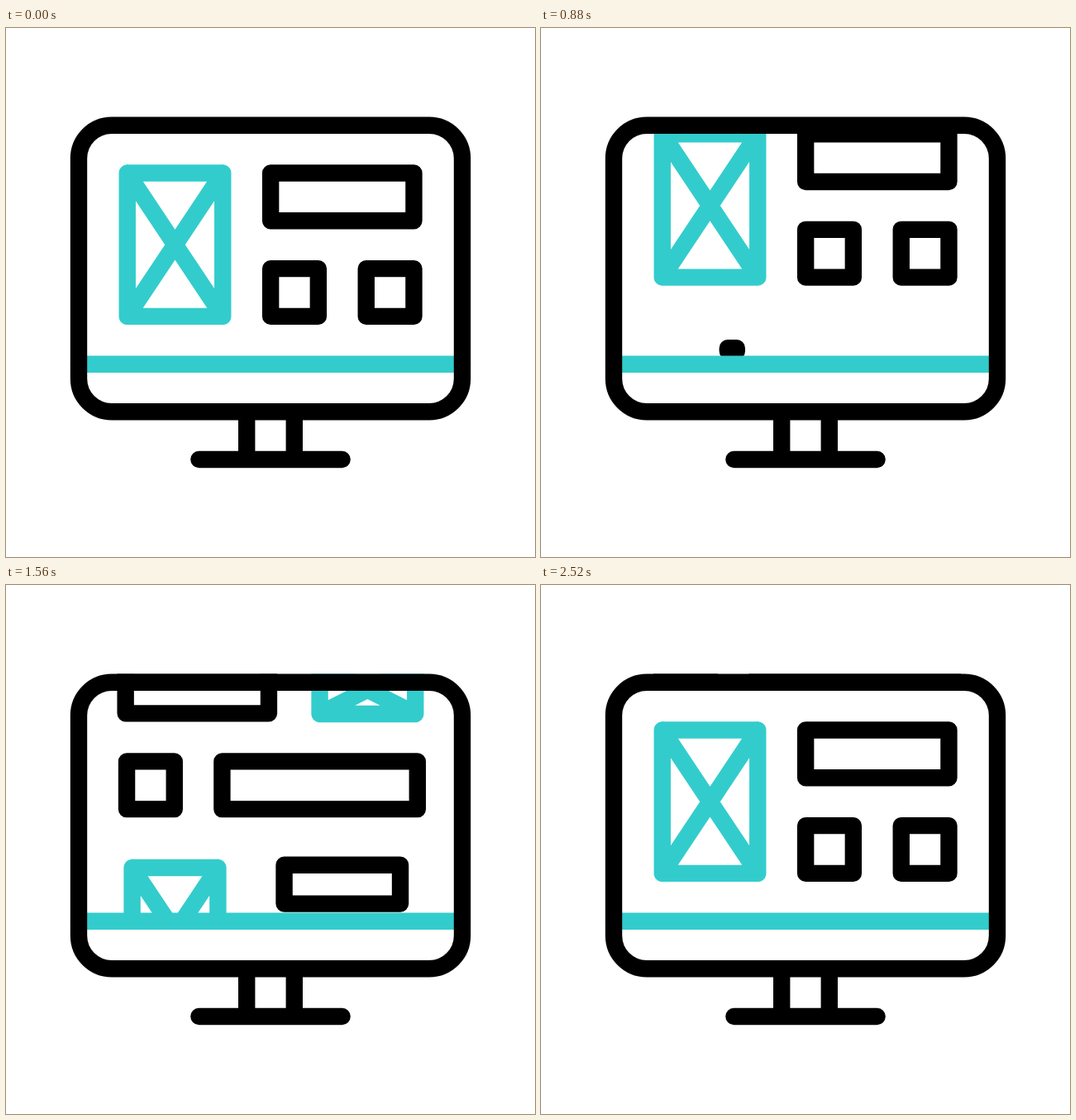
Recreate the animation shown at these times as an HTML page. Size 640x640 px, loop 3 s.

```html
<!DOCTYPE html>
<html lang="en">
<head>
<meta charset="utf-8">
<title>Scrolling wireframe</title>
<style>
  html, body { margin: 0; width: 100%; height: 100%; overflow: hidden; background: #fff; }
  svg { display: block; width: 100%; height: 100%; }
  path, rect.frame { fill: none; stroke: #000; stroke-width: 20.4; stroke-linecap: round; stroke-linejoin: round; }
  path.accent { stroke: #3cc; }
</style>
</head>
<body>
<svg viewBox="0 0 640 640">
  <clipPath id="screen"><rect x="88" y="107.6" width="464" height="309.3"/></clipPath>
  <g id="page" clip-path="url(#screen)"></g>
  <path class="accent" d="M88 406.8H552"/>
  <rect class="frame" x="88" y="117.8" width="464" height="346.5" rx="40"/>
  <path d="M291.2 464.3V522M348.8 464.3V522M233.4 522H406.6"/>
</svg>
<script>
const LOOP = 3000, STEP = 40;
const SCROLL_START = 280, SCROLL_TIME = 2240, DISTANCE = 467.7;
const POP_TIME = 400;
const page = document.getElementById('page');
const clamp = v => Math.min(1, Math.max(0, v));

// Symmetric ease-in-out: cubic-bezier(k, 0, 1 - k, 1), solved by bisection.
function easeInOut(x, k = 0.58) {
  let lo = 0, hi = 1;
  for (let i = 0; i < 30; i++) {
    const s = (lo + hi) / 2, r = 1 - s;
    if (3 * r * r * s * k + 3 * r * s * s * (1 - k) + s ** 3 < x) lo = s; else hi = s;
  }
  return lo * lo * (3 - 2 * lo);
}

const easeOut = s => s + s * s - s ** 3;

const boxes = [];
function addBox(cx, cy, w, h, start = -POP_TIME, image = false) {
  const path = document.createElementNS('http://www.w3.org/2000/svg', 'path');
  if (image) path.setAttribute('class', 'accent');
  page.append(path);
  boxes.push({ path, cx, cy, w, h, start, image });
}

function addHero(y, imageStart, barStart, leftStart, rightStart) {
  addBox(204.5, y + 262.2, 115.5, 173.4, imageStart, true);
  addBox(406.8, y + 204.4, 173.3, 57.8, barStart);
  addBox(349, y + 320, 57.7, 57.8, leftStart);
  addBox(464.6, y + 320, 57.7, 57.8, rightStart);
}

addHero(0);
addBox(231.3, 436.4, 173.3, 57.8, 856);
addBox(437.4, 436.6, 115.7, 58.6, 904, true);
addBox(174.9, 552.2, 57.7, 57.8, 990);
addBox(379.6, 552.2, 236.4, 57.8, 1025);
addHero(DISTANCE, 1256, 1295, 1470, 1509);

function outline({ cx, cy, w, h, image }, scale, scroll) {
  const dx = w * scale / 2, dy = h * scale / 2;
  const l = cx - dx, r = cx + dx, t = cy - dy - scroll, b = cy + dy - scroll;
  const cross = image ? `M${l} ${t}L${r} ${b}M${r} ${t}L${l} ${b}` : '';
  return `M${l} ${t}H${r}V${b}H${l}Z${cross}`;
}

function render(time) {
  const t = Math.floor(time % LOOP / STEP) * STEP;
  const scroll = DISTANCE * easeInOut(clamp((t - SCROLL_START) / SCROLL_TIME));
  for (const box of boxes) {
    const scale = easeOut(clamp((t - box.start) / POP_TIME));
    box.path.setAttribute('d', scale > 0 ? outline(box, scale, scroll) : '');
  }
}

const origin = performance.now();
function tick() {
  render(performance.now() - origin);
  requestAnimationFrame(tick);
}
tick();
</script>
</body>
</html>
```
